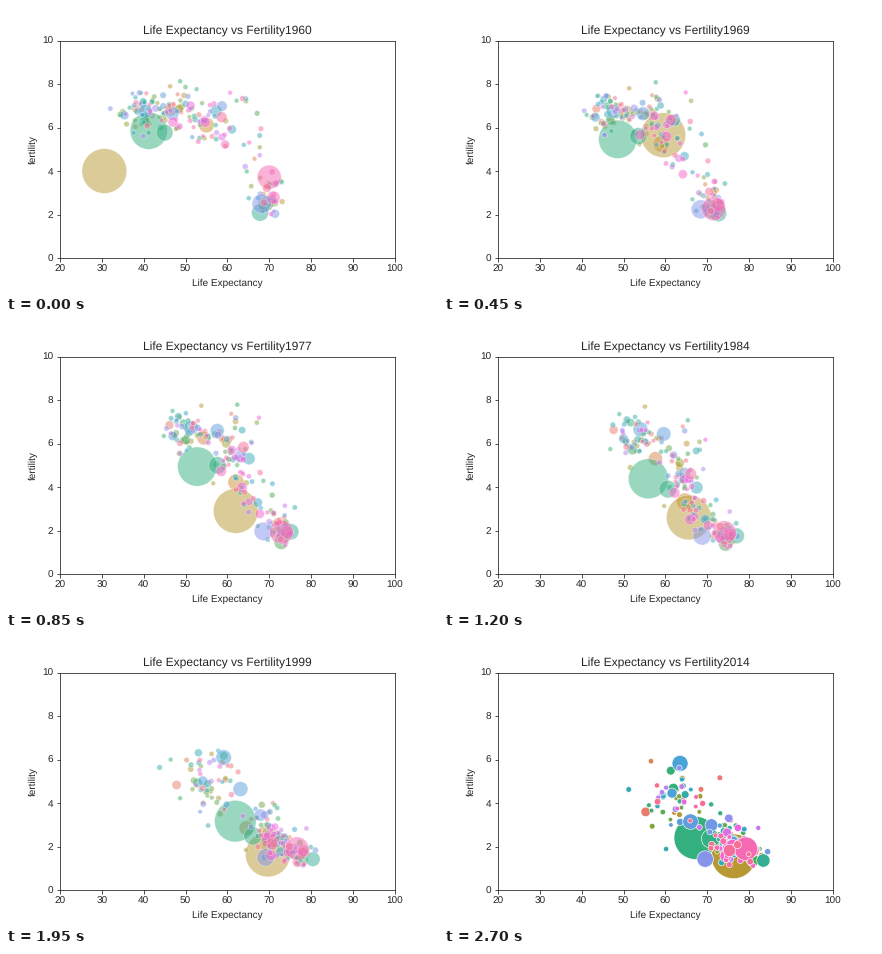
Recreate the animation shown at these times as a matplotlib script. Size 432 px wide and 288 px high, loop 2750 ms.

```python
import numpy as np
import matplotlib.pyplot as plt
from matplotlib.animation import FuncAnimation

plt.rcParams.update({
    "font.family": "Liberation Sans", "font.size": 10, "text.hinting": "none",
    "text.color": ".15", "axes.labelcolor": ".15", "axes.edgecolor": ".15",
    "xtick.color": ".15", "ytick.color": ".15", "axes.linewidth": 0.8,
})

YEARS = np.arange(1960, 2015)
T = np.linspace(0, 1, len(YEARS))

# Evenly spaced hues of equal lightness; the first one closes the circle.
WHEEL = np.array([
    (.968, .441, .536), (.809, .563, .195), (.592, .642, .194),
    (.198, .696, .400), (.210, .677, .643), (.223, .657, .817),
    (.642, .550, .958), (.960, .381, .868), (.968, .441, .536)])

rng = np.random.default_rng(12)
bubbles = []


def color(hue):
    return [np.interp(hue * 8, range(9), channel) for channel in WHEEL.T]


def add(hue, share, life, fert):
    """Store one country; share is its population relative to the largest."""
    bubbles.append((hue, 20 + 1980 * share, life, fert))


def nation(hue, share, life, fert, mid, width=6, bend=1, stall=0):
    """Life follows a power of time, fertility falls along a logistic curve."""
    (young, old), (high, low) = life, fert
    growth = .2 + .18 * high  # large families raise the share
    dent = stall * np.exp(-((YEARS - 1999) / 9) ** 2)
    add(hue, share * (1 + (growth - 1) * T),
        young + (old - young) * T ** bend - dent,
        low + (high - low) / (1 + np.exp((YEARS - mid) / width)))


def wobble():
    return np.sin(rng.uniform(0, 6.3) + rng.uniform(.15, .35) * (YEARS - 1960))


def small(life, fert, mid, **shape):
    share = min(.003 * np.exp(rng.normal(0, 1.1)), .03)
    nation(rng.uniform(), share, life, fert, mid, **shape)
    hue, size, x, y = bubbles.pop()
    bubbles.append((hue, size, x + .3 * wobble(), y + .06 * wobble()))


# The largest country swings hard in the sixties.
keys = [1960, 1961, 1963, 1964, 1969, 1977, 1984, 1991, 2000, 2014]
add(.175, 1 + 0 * T,
    np.interp(YEARS, keys, [30.6, 31.6, 49, 51, 59.5, 62, 65.6, 67, 70, 76.3]),
    np.interp(YEARS, keys, [4, 3.3, 7.4, 6.2, 5.65, 2.9, 2.6, 2.3, 1.55, 1.55]))

# Other populous countries.
nation(.425, .69, (41.2, 67.2), (6.35, 1.9), 1987, 13, .7)
nation(.435, .132, (45, 70.8), (5.8, 2.35), 1983, 5, .62)
nation(.937, .28, (70, 79.2), (4.2, 1.9), 1964, 3)
nation(.13, .108, (55, 75), (7, 1.7), 1976, 10, .9)
nation(.715, .18, (68.2, 69.5), (2.8, 1.4), 1973, 10)
nation(.468, .139, (67.8, 83.4), (2.1, 1.35), 1985, 6, .65)
nation(.645, .085, (40.4, 63.5), (6.75, 5.8), 1995, 5, .65)
nation(.67, .08, (46.8, 66), (6.65, 3), 1998, 5, .5)
nation(.085, .075, (46.5, 71.5), (6.9, 2.2), 1988)
nation(.575, .058, (57.3, 76), (6.9, 2.2), 1981, 6, .75)
nation(.69, .045, (58.7, 71), (7.8, 2.8), 1978, 11, .9)
nation(.97, .05, (58.6, 75.3), (6.5, 1.8), 1986, 5)
nation(.885, .041, (54.7, 74.4), (6.4, 1.55), 1977, 5, .7)
nation(.905, .041, (47, 76), (6.6, 2), 1980, 8, .8)
nation(.345, .109, (69.2, 80.9), (2.5, 1.37), 1971, 2.5)
nation(.93, .079, (71, 81), (2.8, 1.8), 1971, 3)

for _ in range(34):  # early low fertility
    small((rng.normal(69.8, 1.9), rng.normal(79.5, 2.5)),
          (np.clip(rng.normal(2.9, .55), 2.1, 4.2), rng.normal(1.65, .25)),
          rng.normal(1973, 3), width=4)

for _ in range(62):  # steady transition, sooner where lives are long
    young = np.clip(rng.normal(55, 7), 42, 68)
    small((young, rng.normal(75, 2.6)), (rng.normal(6.7, .6), rng.normal(2.1, .4)),
          1984 - 1.15 * (young - 50) + rng.normal(0, 5), width=7, bend=.75)

for _ in range(56):  # late transition with a stall in the nineties
    small((rng.normal(40.5, 3.5), rng.normal(62.5, 4)),
          (rng.normal(6.7, .5), rng.normal(4.1, .8)),
          rng.normal(1995, 5), bend=.7, stall=rng.normal(3, 3))

for _ in range(18):  # long lives, fertility drops late
    small((rng.normal(50, 6), rng.normal(75, 2)),
          (rng.normal(7.3, .55), rng.normal(2.7, .5)),
          rng.normal(1989, 4), width=5, bend=.65)

bubbles.sort(key=lambda b: b[0])
colors = [color(b[0]) for b in bubbles]
sizes, lives, ferts = (np.array([b[k] for b in bubbles]) for k in (1, 2, 3))

fig = plt.figure(figsize=(6, 4), dpi=72, facecolor="white")
fig.subplots_adjust(left=.125, right=.9, bottom=.125, top=.88)
ax = fig.add_subplot()
ax.set(xlim=(20, 100), ylim=(0, 10), xlabel="Life Expectancy", ylabel="fertility")
title = ax.set_title("", fontsize=12)
dots = ax.scatter(lives[:, 0], ferts[:, 0], s=sizes[:, 0], c=colors,
                  edgecolors="white", linewidths=.6, alpha=.5)


def draw(i):
    title.set_text(f"Life Expectancy vs Fertility{YEARS[i]}")
    dots.set_offsets(np.column_stack([lives[:, i], ferts[:, i]]))
    dots.set_sizes(sizes[:, i])
    dots.set_alpha(1 if i == len(YEARS) - 1 else .5)  # the last year is solid
    return dots, title


anim = FuncAnimation(fig, draw, frames=len(YEARS), interval=50,
                     repeat=True, repeat_delay=0)
plt.show()
```
